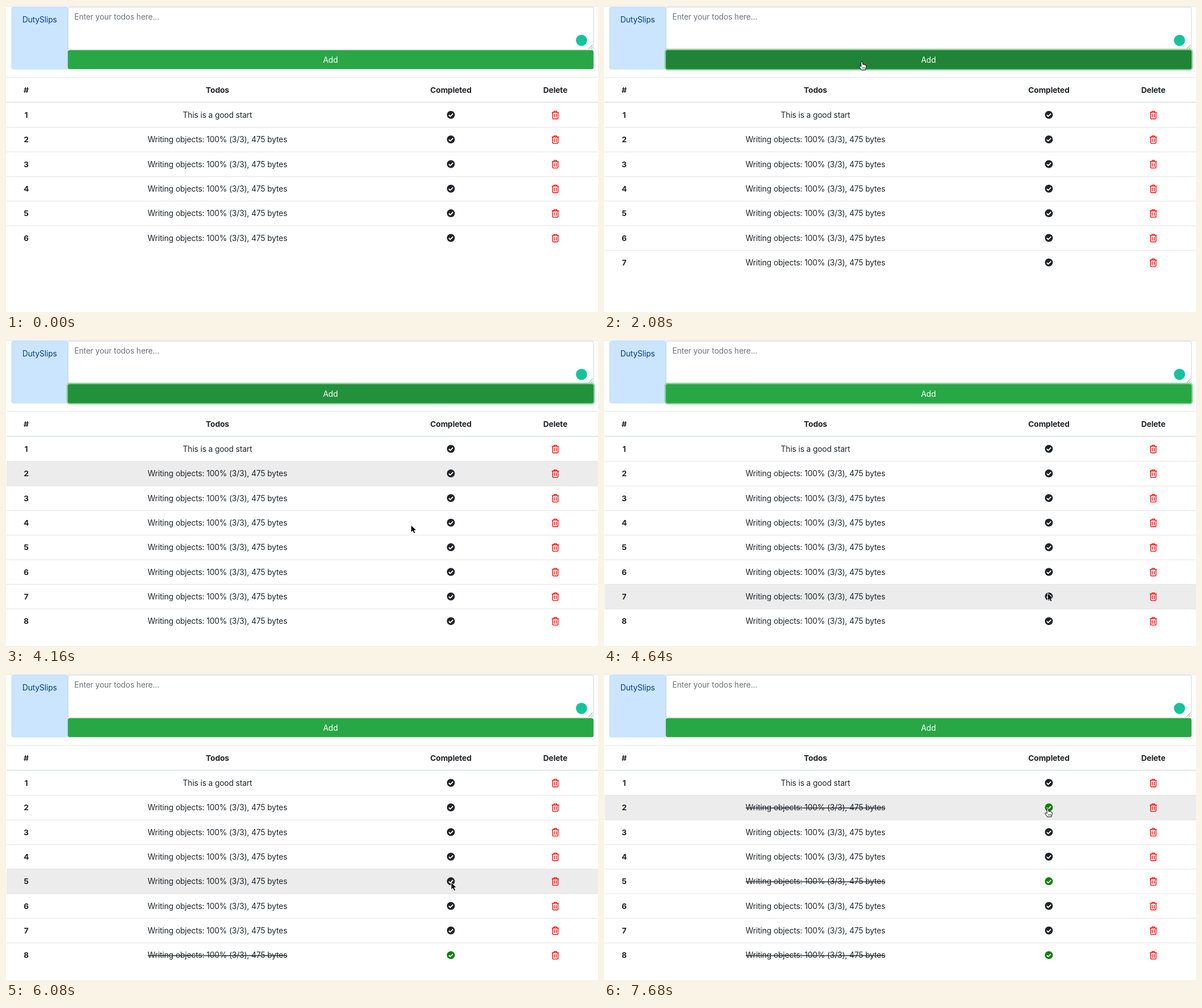
These frames come from a looping animation (1040x539 px, 8000 ms). An HTML page:

```html
<!DOCTYPE html>
<html lang="en">
<head>
<meta charset="utf-8">
<title>Todo table</title>
<style>
  html, body { margin: 0; width: 100%; height: 100%; overflow: hidden; background: #fff; }
  svg { display: block; width: 100vw; height: 100vh; }
  text { font: 13.8px Inter, "Open Sans", sans-serif; letter-spacing: -.01em; fill: #212529; }
  .mid { text-anchor: middle; }
  .bold { font-weight: 700; }
  .done text.todo { text-decoration: line-through; }
  .check { fill: #212529; }
  .done .check { fill: #008000; }
  .line { stroke: #dee2e6; }
  .bin { fill: none; stroke: #f00; stroke-width: 1.35; stroke-linejoin: round; }
</style>
</head>
<body>
<svg viewBox="0 0 1040 539">
  <defs>
    <g id="bin" class="bin">
      <path d="M-6.2 -4.6H6.2M-3.1 -4.6L-1.9 -6.7H1.9L3.1 -4.6M-4.7 -4.6V5.5Q-4.7 6.7 -3.5 6.7H3.5Q4.7 6.7 4.7 5.5V-4.6"/>
      <path d="M-1.7 -2V4.2M1.7 -2V4.2"/>
    </g>
    <path id="arrow" d="M0 0V13L3 10.2L5.1 15L7.6 13.9L5.5 9.3H9.5Z" fill="#000" stroke="#fff"/>
    <path id="beam" d="M-2.5 -6.5Q0 -6.5 0 -5Q0 -6.5 2.5 -6.5M0 -5V5M-2.5 6.5Q0 6.5 0 5Q0 6.5 2.5 6.5M-1.5 2.5H1.5" fill="none" stroke="#222"/>
    <g id="hand" stroke="#000" stroke-width="1" stroke-linejoin="round">
      <path d="M-1.4 8.5V.8Q-1.4 -.6 0 -.6Q1.4 -.6 1.4 .8V4.6Q2.8 3.7 3.6 5Q5 4.2 5.7 5.5Q7.7 5 7.7 7V9.5L6.3 14.2H-.8L-4.5 8.6Q-4.8 7 -3.2 7Z" fill="#fff"/>
      <path d="M1.2 9.5V12M3.2 9.5V12M5.2 9.5V12" stroke-width=".8"/>
    </g>
  </defs>

  <path class="line" d="M0 1H1040"/>
  <rect x="10" y="2" width="98.5" height="109" rx="3.5" fill="#cce5ff" stroke="#b8daff"/>
  <text class="mid" x="59" y="29" style="fill:#004085">DutySlips</text>

  <rect id="fieldRing" x="107.6" y=".6" width="925.8" height="78" rx="5" fill="none" stroke="#007bff" stroke-opacity=".25" stroke-width="2.8"/>
  <rect id="field" x="109" y="2" width="923" height="75" rx="3.5" fill="#fff"/>
  <text id="entry" x="120" y="24"></text>
  <path id="caret" d="M0 11.5V26.5" stroke="#222"/>
  <path d="M1023.5 75.5L1030.5 68.5M1027.5 75.5L1030.5 72.5" stroke="#777" stroke-width=".9"/>
  <circle cx="1011" cy="60.5" r="9.8" fill="#15c39a"/>

  <rect id="buttonRing" x="106.2" y="75.2" width="928.4" height="38.4" rx="5.5" fill="#94d3a2"/>
  <rect id="button" x="108.6" y="77.8" width="923.6" height="33.4" rx="3.5"/>
  <text class="mid" x="570" y="100" style="fill:#fff">Add</text>

  <path class="line" d="M1 125.7H1040"/>
  <g class="mid">
    <text class="bold" x="35.5" y="153">#</text>
    <text class="bold" x="371.5" y="153">Todos</text>
    <text class="bold" x="781.5" y="153">Completed</text>
    <text class="bold" x="965" y="153">Delete</text>
  </g>
  <g id="rows"></g>
  <path class="line" d="M1 169.6H1040" stroke-width="1.8"/>
  <use id="pointer"/>
</svg>
<script>
const LOOP = 8000, STEP = 160, PITCH = 43.35, TOP = 170.3;
const TODO = 'Writing objects: 100% (3/3), 475 bytes';
const $ = id => document.getElementById(id);
const show = (el, on) => { el.style.display = on ? '' : 'none'; };
const within = (t, spans) => spans.some(([from, to]) => t >= from && t < to);

// Pointer cues: time, x, y, shape
const path = [
  [160, 470, 385, 'arrow'], [320, 450, 66, 'beam'], [480, 440, 48, 'beam'],
  [960, 438, 46, 'beam'], [1440, 437, 60, 'beam'], [1600, 437, 82, 'beam'],
  [1760, 453, 98.5, 'hand'],
  [2560, 446, 64, 'beam'], [2720, 440, 48, 'beam'], [3200, 437, 82, 'beam'],
  [3360, 453, 98.5, 'hand'],
  [4000, 600, 235, 'arrow'], [4160, 711.5, 326, 'arrow'], [4320, 755, 395, 'arrow'],
  [4480, 775, 435, 'arrow'], [4640, 779.5, 446, 'arrow'], [4800, 781, 484, 'arrow'],
  [4960, 780, 497, 'hand'],
  [5920, 782, 376, 'arrow'], [6080, 782, 367, 'arrow'], [6240, 780, 367, 'hand'],
  [6880, 781, 358, 'arrow'], [7040, 780, 330, 'arrow'], [7200, 779, 250, 'arrow'],
  [7360, 779.5, 237.5, 'hand']
];
// Button colour cues
const shades = [
  [0, '#28a745'], [1760, '#218838'], [1920, '#1e7e34'], [2080, '#1f8436'], [2240, '#218838'],
  [2560, '#23913b'], [2720, '#28a745'], [3360, '#218838'], [3520, '#1e7e34'],
  [3680, '#1f8436'], [3840, '#218838'], [4160, '#23913b'], [4320, '#28a745']
];
const addedAt = { 7: 2080, 8: 3680 };
const doneAt = { 8: 5280, 5: 6400, 2: 7680 };
const fieldFocus = [[640, 1920], [2880, 3520]];
const buttonFocus = [[1920, 2880], [3520, 5280]];
const filled = [[1280, 2080], [3040, 3680]];
const hoverStart = 4160;

const cueAt = (cues, t) => cues.findLast(cue => cue[0] <= t);

$('rows').innerHTML = Array.from({ length: 8 }, (_, i) => {
  const y = 192 + i * PITCH, top = TOP + i * PITCH;
  return `<g>
    <rect class="back" x="1" y="${top}" width="1039" height="${PITCH}" fill="#ececec"/>
    ${i ? `<path class="line" d="M1 ${top}H1040"/>` : ''}
    <text class="mid bold" x="35.5" y="${y + 5}">${i + 1}</text>
    <text class="mid todo" x="371.5" y="${y + 5}">${i ? TODO : 'This is a good start'}</text>
    <circle class="check" cx="781.5" cy="${y - .3}" r="7"/>
    <path d="M777.9 ${y}l2.5 2.5l4.9 -4.9" fill="none" stroke="#fff" stroke-width="1.8"/>
    <use href="#bin" x="965" y="${y}"/>
  </g>`;
}).join('');
const rows = [...$('rows').children];

function draw(t) {
  const typed = within(t, filled), focused = within(t, fieldFocus);
  const entry = $('entry');
  entry.textContent = typed ? TODO : 'Enter your todos here...';
  entry.style.fill = typed ? '#495057' : '#6c757d';
  show($('fieldRing'), focused);
  $('field').setAttribute('stroke', focused ? '#80bdff' : '#ced4da');
  show($('caret'), focused);
  const caretX = typed ? 120.5 + entry.getComputedTextLength() : 120.5;
  $('caret').setAttribute('transform', `translate(${caretX})`);

  show($('buttonRing'), within(t, buttonFocus));
  $('button').setAttribute('fill', cueAt(shades, t)[1]);

  // Row highlighting trails the pointer by one step
  const trail = t >= hoverStart && cueAt(path, t - STEP);
  const hovered = trail ? Math.floor((trail[2] - TOP) / PITCH) : -1;
  rows.forEach((row, i) => {
    show(row, t >= (addedAt[i + 1] || 0));
    show(row.querySelector('.back'), i === hovered);
    row.classList.toggle('done', t >= (doneAt[i + 1] ?? LOOP));
  });

  const cue = cueAt(path, t), pointer = $('pointer');
  show(pointer, cue);
  if (cue) {
    pointer.setAttribute('href', '#' + cue[3]);
    pointer.setAttribute('transform', `translate(${cue[1]} ${cue[2]})`);
  }
}

let shown = -1;
function tick() {
  const t = Math.floor(performance.now() % LOOP / STEP) * STEP;
  if (t !== shown) draw(shown = t);
  requestAnimationFrame(tick);
}
tick();
</script>
</body>
</html>
```
